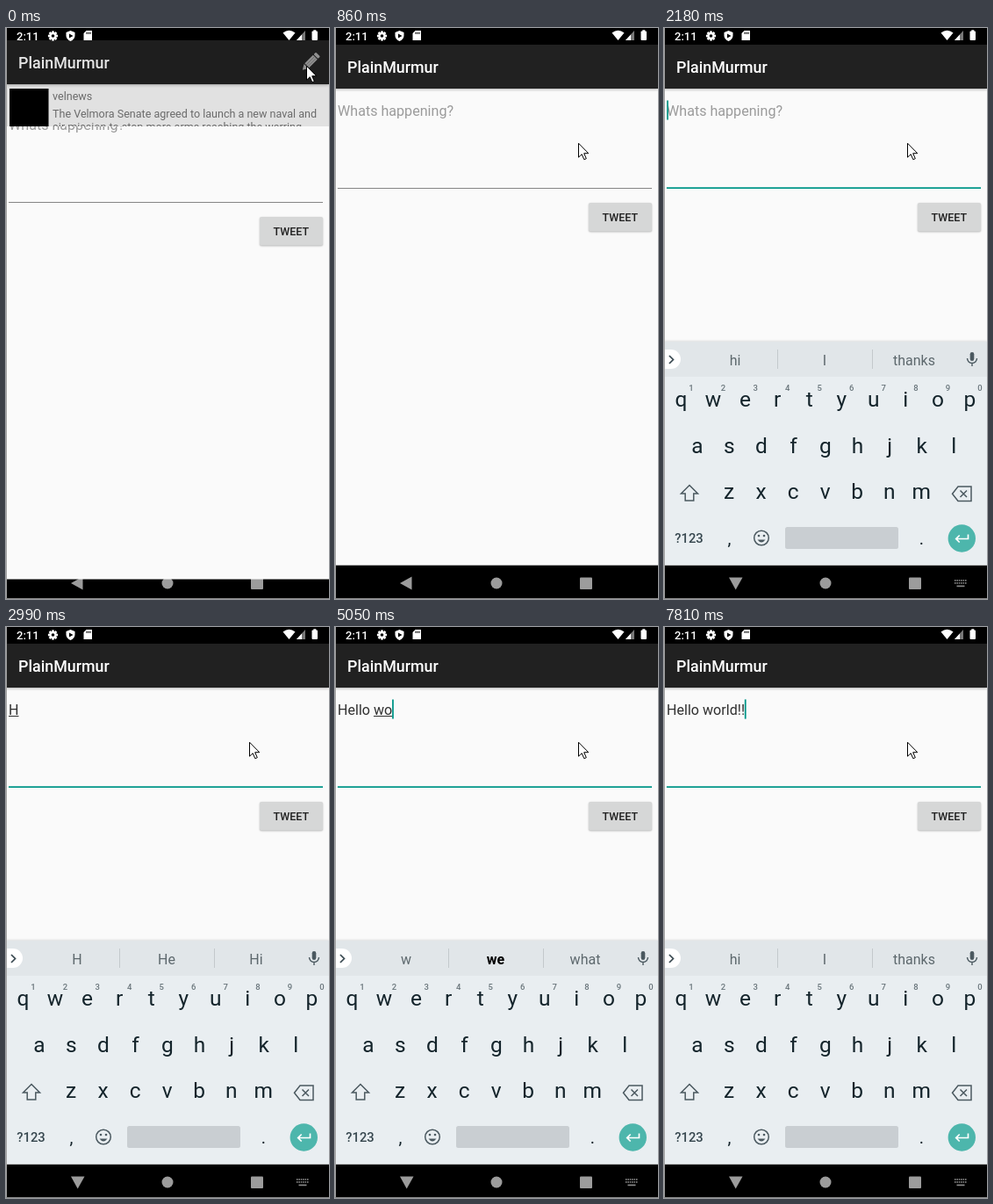
An HTML page with a canvas for the animation above (8 s loop, 368 px wide and 650 px high).

```html
<!DOCTYPE html>
<html lang="en">
<head>
<meta charset="utf-8">
<title>Compose screen</title>
<style>
html, body { margin: 0; width: 100%; height: 100%; overflow: hidden; background: #000; }
canvas { display: block; width: 368px; height: 650px; }
</style>
</head>
<body>
<canvas id="stage"></canvas>
<script>
const W = 368, H = 650, NAV = 611.4, LOOP = 8000, TEAL = '#009688', INK = '#14242b';
const canvas = document.getElementById('stage');
const ratio = window.devicePixelRatio || 1;
canvas.width = W * ratio;
canvas.height = H * ratio;
const c = canvas.getContext('2d');

// time, text, start of the underlined word (-1: none), caret, suggestions
const STATES = [
  [0, '', -1, 0, ''],
  [1130, '', -1, 1, ''],
  [1790, '', -1, 0, 'hi|I|thanks'],
  [2180, '', -1, 1, 'hi|I|thanks'],
  [2600, 'H', 0, 1, 'H|He|Hi'],
  [2990, 'H', 0, 0, 'H|He|Hi'],
  [3390, 'He', 0, 1, 'He|Hey|Hello'],
  [3580, 'Hel', 0, 1, 'Hel|Hello|Help'],
  [3760, 'Hell', 0, 1, 'Hell|Hello|Hello I'],
  [3950, 'Hello', 0, 1, 'Hello|Hello I|Hello my'],
  [4470, 'Hello', 0, 0, 'Hello|Hello I|Hello my'],
  [4750, 'Hello ', -1, 1, 'my|I|there'],
  [4920, 'Hello w', 6, 1, 'w|*we|what'],
  [5050, 'Hello wo', 6, 1, 'w|*we|what'],
  [5180, 'Hello wo', 6, 1, 'wo|would|work'],
  [5320, 'Hello wor', 6, 1, 'wor|work|world'],
  [5460, 'Hello worl', 6, 1, 'worl|*world|would'],
  [5590, 'Hello world', 6, 1, "world|would|world's"],
  [6030, 'Hello world', 6, 0, "world|would|world's"],
  [6610, 'Hello world', 6, 1, "world|would|world's"],
  [7020, 'Hello world', 6, 0, "world|would|world's"],
  [7540, 'Hello world!', -1, 1, "world|would|world's"],
  [7680, 'Hello world!!', -1, 1, "world|would|world's"],
  [7810, 'Hello world!!', -1, 1, 'hi|I|thanks']
];

const clamp = v => Math.max(0, Math.min(1, v));
const held = (t, stops) => stops.filter(s => s <= t).pop() || 0;

function rect(x, y, w, h, color, r = 0) {
  c.fillStyle = color;
  c.beginPath();
  c.roundRect(x, y, w, h, r);
  c.fill();
}

function circle(x, y, r, color) {
  c.fillStyle = color;
  c.beginPath();
  c.arc(x, y, r, 0, 7);
  c.fill();
}

function path(d, fill, stroke, width = 1.5) {
  const p = new Path2D(d);
  if (fill) { c.fillStyle = fill; c.fill(p); }
  if (stroke) { c.strokeStyle = stroke; c.lineWidth = width; c.stroke(p); }
}

function text(s, x, y, size, color, weight = 400, align = 'left') {
  c.font = `${weight} ${size}px Roboto, sans-serif`;
  c.textAlign = align;
  c.fillStyle = color;
  c.fillText(s, x, y);
}

function shadow(color, blur, y, draw) {
  c.save();
  c.shadowColor = color;
  c.shadowBlur = blur * ratio;
  c.shadowOffsetY = y * ratio;
  draw();
  c.restore();
}

function page() {
  rect(0, 0, W, NAV, '#fafafa');
  shadow('rgba(0,0,0,.3)', 3, 1, () => rect(0, 19, W, 50, '#212121'));
  rect(0, 0, W, 19, '#000');
  text('PlainMurmur', 14, 51, 17.85, '#fff', 500);
}

function statusIcons() {
  text('2:11', 12, 14, 13, '#fff', 500);
  for (let i = 0; i < 8; i++) {
    c.save();
    c.translate(53.5, 9);
    c.rotate(i * Math.PI / 4);
    rect(-1.3, -5.6, 2.6, 3, '#fff');
    c.restore();
  }
  circle(53.5, 9, 4.2, '#fff');
  circle(53.5, 9, 1.8, '#000');
  path('M73.5 3L78.5 5V9Q78 13 73.5 15Q69 13 68.5 9V5Z', '#fff');
  path('M72 6.5L76.5 9L72 11.5Z', '#000');
  path('M91.5 3H98V14H88.5V6Z', '#fff');
  for (const x of [91.5, 93.5, 95.5]) rect(x, 4.5, 1, 2.5, '#000');
  path('M315.5 5.5Q322.5 0 329.5 5.5L322.5 14Z', '#fff');
  path('M341 3V14H331Z', '#777');
  path('M337 7.4V14H331Z', '#fff');
  rect(348.5, 3.5, 6.5, 10.5, '#fff', 1);
  rect(350.3, 2.3, 3, 2, '#fff');
}

function navBar(keys) {
  const grey = '#9c9c9c';
  rect(0, NAV, W, H - NAV, '#000');
  path(keys ? 'M74 625.5H89.5L81.7 639.5Z' : 'M74 632L87.5 624.5V639.5Z', grey);
  circle(184, 632, 6.5, grey);
  rect(279, 625.5, 14, 13.5, grey, 1);
  if (!keys) return;
  for (let i = 0; i < 12; i++) rect(331 + i % 6 * 2.4, 628 + (i > 5 ? 3 : 0), 1.5, 1.7, '#858585');
  rect(333.5, 634.5, 9, 1.7, '#858585');
}

function listPage() {
  c.save();
  c.translate(0, -5);
  page();
  c.save();
  c.translate(347, 43.5);
  c.rotate(Math.PI / 4);
  rect(-3.5, -12, 7, 3.5, '#a0a0a0', 1);
  rect(-3.5, -7.5, 7, 13.5, '#a0a0a0');
  path('M-3.5 7H3.5L0 13Z', '#a0a0a0');
  path('M-1 -7V6M1.5 -7V6', null, '#666', .7);
  c.restore();
  rect(4, 74, 44.5, 45, '#000');
  text('velnews', 53, 87, 12.55, '#777');
  text('The Velmora Senate agreed to launch a new naval and', 53, 107, 12.55, '#777');
  text('air mission to stop more arms reaching the warring', 53, 121.5, 12.55, '#777');
  c.restore();
  rect(0, 14, W, NAV - 14, 'rgba(0,0,0,.1)');
}

function composePage(t, [, typed, mark, caret]) {
  page();
  text(typed || 'Whats happening?', 3, 100, 16.1, typed ? '#303030' : '#9b9b9b');
  const end = 3 + (typed ? c.measureText(typed).width : 0);
  if (mark >= 0) {
    const start = 3 + c.measureText(typed.slice(0, mark)).width;
    rect(start, 101, end - start, 1, '#303030');
  }
  if (caret) rect(end + (typed ? -.2 : .2), 82.4, 1.8, 22.2, TEAL);
  if (t < 1130) rect(3, 182, 358, 1, '#858585');
  else rect(3, 181.2, 358, 1.8, t < 1250 ? '#45908a' : TEAL);
  shadow('rgba(0,0,0,.28)', 2, .7, () => rect(289, 199, 72, 32.5, '#d6d7d7', 2));
  text('TWEET', 324.8, 220, 12.5, '#212121', 500, 'center');
}

function suggestions(words) {
  rect(0, 357, W, 40, '#e1e6e9');
  path('M0 366H8A11 11 0 0 1 8 388H0Z', '#fff');
  path('M6 373L10.5 377.5L6 382', null, '#37474f', 1.7);
  if (words) {
    words.split('|').forEach((word, i) => {
      const bold = word[0] === '*';
      text(word.replace('*', ''), 81 + 102 * i, 384, 16, bold ? '#000' : '#5d686d', bold ? 700 : 400, 'center');
    });
    rect(129, 366, 1, 22, '#c3c9cc');
    rect(237, 366, 1, 22, '#c3c9cc');
  }
  rect(348.7, 369, 4.6, 10, '#4b5960', 2.3);
  path('M345.5 376A5.5 5.5 0 0 0 356.5 376M351 381.5V385', null, '#4b5960', 1.4);
}

function keyboard(words, upper) {
  rect(0, 357, W, NAV - 357, '#e9eef1');
  suggestions(words);
  const rows = [['qwertyuiop', 19.5, 431], ['asdfghjkl', 37.8, 483.5], ['zxcvbnm', 74, 536.3]];
  for (const [letters, x, y] of rows) {
    [...(upper ? letters.toUpperCase() : letters)].forEach((ch, i) =>
      text(ch, x + 36.55 * i, y, 24.5, INK, 400, 'center'));
  }
  for (let i = 0; i < 10; i++) text((i + 1) % 10, 31 + 36.55 * i, 413, 9.5, '#69757b', 500, 'center');
  path('M29 520.5L38.5 530H33.8V538H24.2V530H19.5Z', upper ? INK : null, '#4b5960', 1.5);
  path('M335 522H350V538.5H335L328.5 530.2Z', null, '#4b5960', 1.5);
  path('M337.5 526.5L345 534M345 526.5L337.5 534', null, '#4b5960', 1.5);
  text('?123', 28.5, 586, 14.8, '#37474f', 500, 'center');
  text(',', 74.5, 588, 20, INK, 400, 'center');
  text('.', 293.5, 588, 20, INK, 400, 'center');
  path('M102.7 580.5A8.3 8.3 0 1 0 119.3 580.5A8.3 8.3 0 1 0 102.7 580.5', null, '#4b5960', 1.5);
  circle(108, 578, 1.3, '#4b5960');
  circle(114, 578, 1.3, '#4b5960');
  path('M106.5 582.5Q111 588.5 115.5 582.5Z', '#4b5960');
  rect(138, 568, 129, 25, '#c9ced2', 2.5);
  circle(339.3, 581, 15.7, '#4db6ac');
  path('M346.5 576.5V581.5H333M336.7 577.5L332.7 581.5L336.7 585.5', null, '#fff', 1.7);
}

function pointer(t) {
  const p = clamp((held(t, [0, 140, 270, 400, 530, 700, 860]) - 140) / 720);
  const e = p * p * (3 - 2 * p);
  c.save();
  c.translate(342 - 65 * e, 42.7 + 88 * e);
  path('M.5 .5V16.5L4.2 13L6.8 19L9.3 18L6.7 12H11.8Z', '#fff', '#000', 1);
  c.restore();
}

function draw(t) {
  const state = STATES.filter(s => s[0] <= t).pop();
  const keys = t >= 1530;
  const left = (1 - clamp(held(t, [0, 140, 270, 400]) / 400)) ** 2;
  c.setTransform(ratio, 0, 0, ratio, 0, 0);
  navBar(keys);
  if (left) listPage();

  // The new page slides up while its top edge is uncovered.
  c.save();
  c.beginPath();
  c.rect(0, 112 * left, W, H);
  c.clip();
  c.translate(0, 16 * left);
  composePage(t, state);
  c.restore();
  statusIcons();

  if (keys) {
    const k = clamp((held(t, [1530, 1660]) - 1400) / 260);
    c.save();
    c.beginPath();
    c.rect(0, 0, W, NAV);
    c.clip();
    c.globalAlpha = k;
    c.translate(0, 50 * (1 - k));
    shadow('rgba(0,0,0,.2)', 3, 0, () => rect(0, 357, W, 254, '#e9eef1'));
    keyboard(state[4], t >= 2440 && t < 2600);
    c.restore();
  }
  pointer(t);
  rect(0, 0, 1, H, '#a3a3a3');
  rect(0, H - 1, W, 1, '#8a8a8a');
}

const begin = performance.now();
function tick() {
  draw((performance.now() - begin) % LOOP);
  requestAnimationFrame(tick);
}
tick();
</script>
</body>
</html>
```
